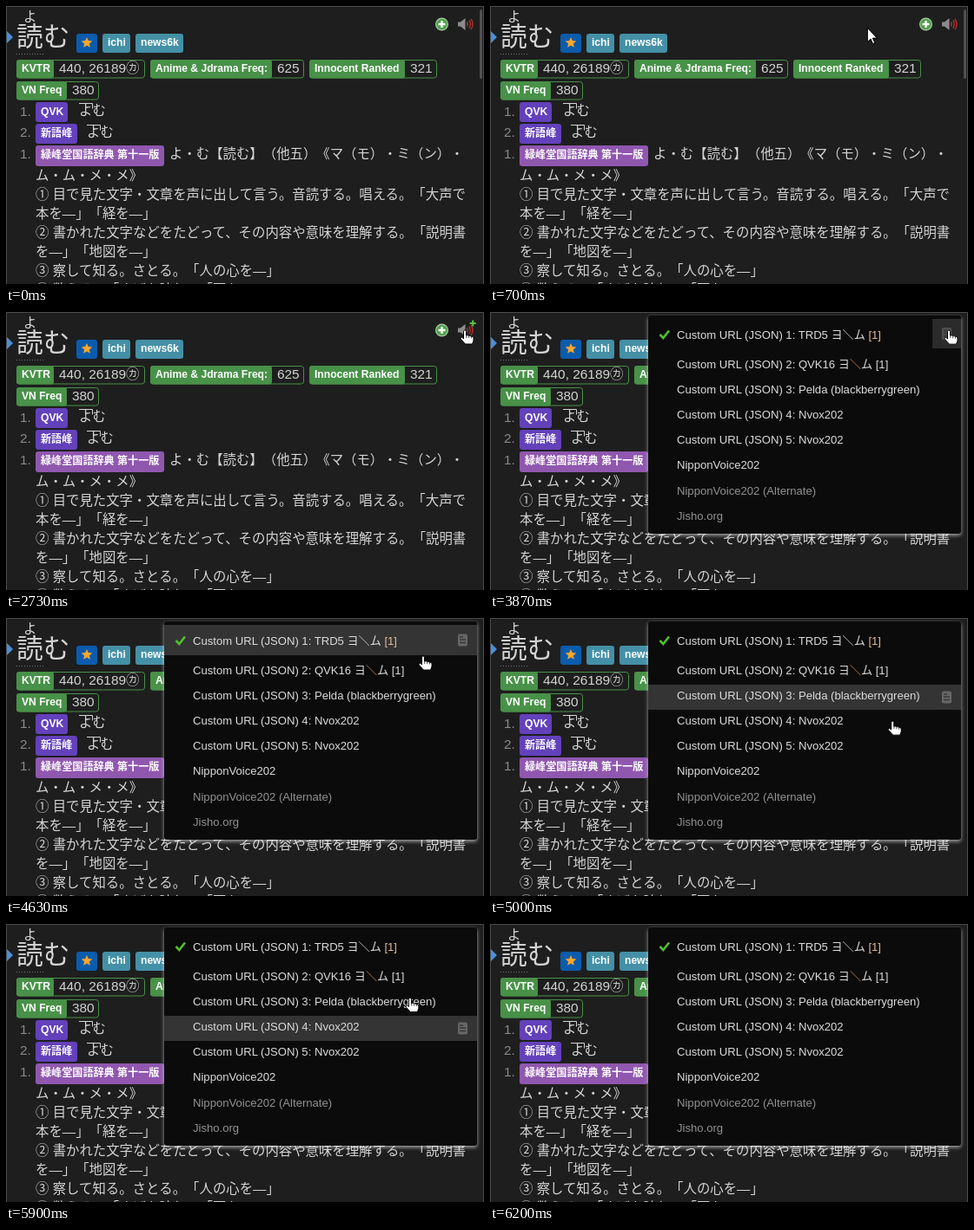
An HTML page that plays this animation: 550x321 px, repeating every 8.33 s.

```html
<!DOCTYPE html>
<html lang="ja">
<head>
<meta charset="utf-8">
<title>Dictionary popup</title>
<style>
html, body { margin: 0; width: 100%; height: 100%; overflow: hidden; background: #1e1e1e; }
svg { display: block; width: 550px; height: 321px; }
text { font: 15.4px "Liberation Sans", "Noto Sans CJK JP", "Noto Sans CJK", sans-serif; fill: #d4d4d4; text-spacing-trim: space-all; white-space: pre; }
.label { font-size: 12.1px; font-weight: bold; fill: #fff; }
.head { font-size: 30.8px; }
.num { fill: #8a8a8a; }
.item { font-size: 13.1px; fill: #dcdcdc; }
.off { fill: #929292; }
.shade { filter: drop-shadow(0 2px 2px rgba(255, 255, 255, .6)); }
</style>
</head>
<body>
<svg id="stage" viewBox="0 0 550 321"></svg>
<script>
const LOOP = 8330;
const GREEN = '#489148', TEAL = '#4490a6', VIOLET = '#6341bb';

const text = (x, y, s, cls = '') => `<text x="${x}" y="${y}" class="${cls}">${s}</text>`;
const rect = (x, y, w, h, fill, r = 0, more = '') =>
  `<rect x="${x}" y="${y}" width="${w}" height="${h}" rx="${r}" fill="${fill}" ${more}/>`;
const path = (d, more) => `<path d="${d}" ${more}/>`;
const tag = (x, y, w, h, fill, s) =>
  rect(x, y, w, h, fill, 3) + text(x + 6, Math.floor(y + h / 2 + 3.6), s, 'label');
const freq = (x, y, head, w, name, value) =>
  rect(x + .5, y + .5, w - 1, 20.5, 'none', 3, `stroke="${GREEN}"`) +
  tag(x, y, head, 21.5, GREEN, name) + text(x + head + 6, y + 15, value);
const pitch = (x, y) => text(x, y, 'よむ') +
  path(`M${x} ${y - 13.5}h15.5v6`, 'fill="none" stroke="#d4d4d4"');

const star = Array.from({ length: 10 }, (_, i) => {
  const r = i % 2 ? 3 : 6.6, a = i * Math.PI / 5;
  return `${93 + r * Math.sin(a)},${42.5 - r * Math.cos(a)}`;
}).join(' ');

const lines = [
  'ム・ム・メ・メ》',
  '① 目で見た文字・文章を声に出して言う。音読する。唱える。「大声で',
  '本を—」「経を—」',
  '② 書かれた文字などをたどって、その内容や意味を理解する。「説明書',
  'を—」「地図を—」',
  '③ 察して知る。さとる。「人の心を—」',
  '④ 数える。「さばを読む」「票を—」'
];

const page = [
  path('M1 29L8 36L1 43Z', 'fill="#4a8fd8"'),
  text(20, 18, 'よ'), text(12, 46, '読む', 'head'),
  path('M12 55.5H43', 'stroke="#777" stroke-dasharray="1 2"'),
  rect(81, 32, 24, 22, '#0b5cad', 3), `<polygon points="${star}" fill="#ffa62b"/>`,
  tag(111, 32, 32, 22, TEAL, 'ichi'), tag(149, 32, 55, 22, TEAL, 'news6k'),
  freq(12, 62, 43, 148, 'KVTR', '440, 26189㋕'),
  freq(166, 62, 140, 177, 'Anime &amp; Jdrama Freq:', '625'),
  freq(349, 62, 110, 147, 'Innocent Ranked', '321'),
  freq(12, 87, 58, 95, 'VN Freq', '380'),
  text(16, 127, '1.', 'num'), tag(34, 111, 37, 23, VIOLET, 'QVK'), pitch(84, 126),
  text(16, 151, '2.', 'num'), tag(34, 136, 48, 23, VIOLET, '新語峰'), pitch(93, 151),
  text(16, 176, '1.', 'num'), tag(34, 161, 148, 24, '#9057af', '緑峰堂国語辞典 第十一版'),
  text(188, 176, 'よ・む【読む】（他五）《マ（モ）・ミ（ン）・'),
  ...lines.map((s, i) => text(34, 201 + 22 * i, s)),
  '<circle cx="501.5" cy="21" r="7.5" fill="#a9cfa5"/><circle cx="501.5" cy="21" r="6.3" fill="#4f9f4a"/>',
  path('M497.5 21h8M501.5 17v8', 'stroke="#fff" stroke-width="2.4"'),
  '<g id="speaker">',
  path('M520 18.5h3l5.5-4.5v14l-5.5-4.5h-3Z', 'fill="#8b8b8b"'),
  path('M530.5 18.5q1.6 2.5 0 5M532.8 16.5q3 4.5 0 9M535 14.8q4 6.2 0 12.4', 'fill="none" stroke="#b3322c" stroke-width="1.4"'),
  '</g>',
  path('M533.7 13h7M537.2 9.5v7', 'id="badge" stroke="#5cc13c" stroke-width="2"'),
  rect(545, 4, 3, 80, '#505050', 1.5, 'id="thumb"'),
  path('M.5 321V.5H549.5V321', 'fill="none" stroke="#4c4c4c"')
];

const custom = n => `Custom URL (JSON) ${n}: `;
const items = [
  [31, custom(1) + 'TRD5 ヨ＼ム <tspan fill="#e2bd95">[1]</tspan>'],
  [65, custom(2) + 'QVK16 ヨ<tspan fill="#cf8f5c">＼</tspan>ム [1]'],
  [94, custom(3) + 'Pelda (blackberrygreen)'],
  [123, custom(4) + 'Nvox202'],
  [152, custom(5) + 'Nvox202'],
  [181, 'NipponVoice202'],
  [211, 'NipponVoice202 (Alternate)', 'off'],
  [240, 'Jisho.org', 'off']
];
const card = y => rect(520, y - 7, 11, 14, '#666', 2) +
  path(`M522 ${y - 3.5}h4M522 ${y - .5}h7M522 ${y + 3}h7`, 'stroke="#383838" stroke-width="1.4"');
const rowBounds = [[8, 35], [48, 29], [77, 29], [106, 29], [135, 29]];

const menu = '<g id="menu">' +
  rect(182, 4, 360, 252, '#0b0b0b', 3, 'class="shade"') +
  `<g id="button">${rect(509, 8, 33, 34, '#2b2b2b')}<g opacity=".6">${card(25)}</g></g>` +
  rowBounds.map(([y, h]) => `<g class="hover">${rect(182, y, 360, h, '#343434')}${card(y + h / 2)}</g>`).join('') +
  path('M195.5 26L199.3 30L206 21.5', 'fill="none" stroke="#4fc02f" stroke-width="2.6"') +
  items.map(([y, s, cls = '']) => text(215, y, s, 'item ' + cls)).join('') + '</g>';

const ink = 'fill="#fff" stroke="#000" stroke-linejoin="round"';
const cursors =
  path('M0 0V16l3.7-3.5 2.4 5.6 2.3-1-2.4-5.5H11Z', 'id="arrow" ' + ink) +
  '<g id="hand">' +
  path('M-1 1.5c0-2 3-2 3 0V6c2-.6 3 .2 3.2.6 1.3-.4 2.4.2 2.7.8 1.6-.2 2.6.6 2.6 2V12l-1.5 4H1L-4 10.5C-5.2 9-3.4 7.6-2 8.8L-1 10Z', ink) +
  path('M2.3 6v3M5.2 6.8v2.4M7.9 7.6v2', 'stroke="#000" stroke-width=".7"') + '</g>';

const $ = id => document.getElementById(id);
$('stage').innerHTML = page.join('') + menu + cursors;
const hovers = [...document.querySelectorAll('.hover')];

const clamp = v => Math.max(0, Math.min(1, v));
const smooth = k => k * k * (3 - 2 * k);
const linear = k => k;
const easeOut = k => 1 - (1 - k) ** 2;

// time, pointer tip x, y, easing towards this point
const moves = [
  [270, 300, -19], [830, 442, 28, easeOut],
  [1000, 442, 28], [1330, 527.5, 21, smooth],
  [3850, 527.5, 21], [4200, 527.5, 37, smooth],
  [4380, 527.5, 37], [4630, 479.5, 44, linear],
  [5300, 458.5, 138, easeOut], [5710, 458.5, 138], [6200, 476, -19, smooth]
];
// time, highlighted menu row (-1 for none)
const hoverAt = [[0, -1], [4400, 0], [4700, 1], [4940, 2], [5190, 3], [5530, 4],
  [5830, 3], [5920, 2], [6010, 1], [6080, 0], [6190, -1]];

function pointer(t) {
  const i = moves.findIndex(m => m[0] > t);
  if (i < 1) return null;
  const [t0, x0, y0] = moves[i - 1], [t1, x1, y1, ease = linear] = moves[i];
  const k = ease((t - t0) / (t1 - t0));
  return [x0 + (x1 - x0) * k, y0 + (y1 - y0) * k];
}

const show = (el, a) => el.setAttribute('opacity', a);

function draw(now) {
  const t = now % LOOP;
  const p = pointer(t), isHand = p && p[0] > 515 || t > 1330;
  for (const id of ['arrow', 'hand']) {
    const on = p && (id === 'hand') === isHand;
    show($(id), on ? 1 : 0);
    if (on) $(id).setAttribute('transform', `translate(${p})`);
  }
  const dip = clamp((t - 1780) / 125) - clamp((t - 1945) / 125);
  show($('speaker'), 1 - .75 * dip);
  show($('badge'), clamp((t - 1945) / 125));
  show($('thumb'), t < 2530 ? 1 : t < 2730 ? .5 : 0);
  show($('menu'), clamp((t - 3110) / 90));
  show($('button'), t < 4400 ? 1 : 0);
  const row = hoverAt.findLast(h => h[0] <= t)[1];
  hovers.forEach((el, i) => show(el, i === row ? 1 : 0));
}

let start;
function tick(now) {
  start ??= now;
  draw(now - start);
  requestAnimationFrame(tick);
}
draw(0);
requestAnimationFrame(tick);
</script>
</body>
</html>
```
